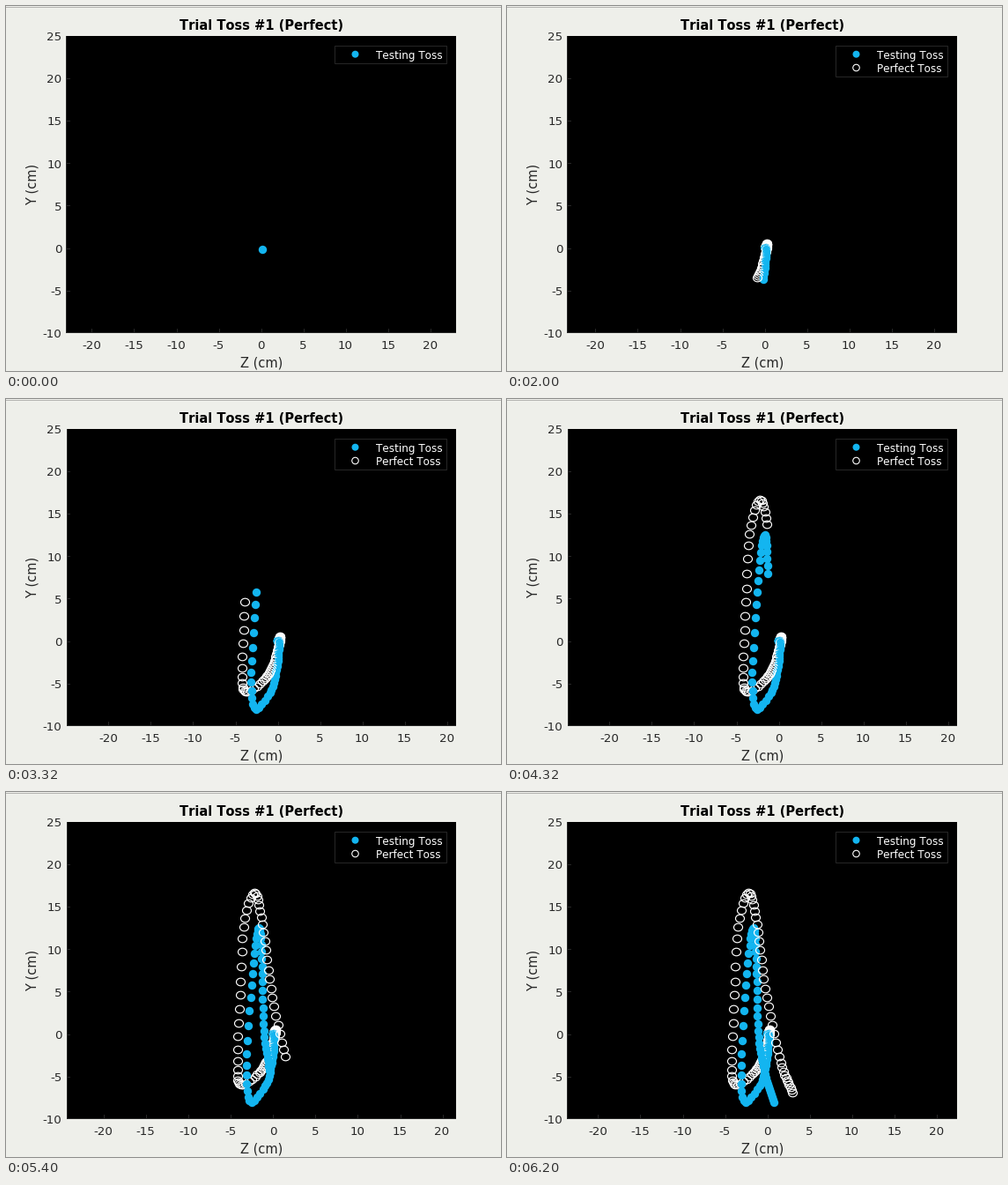
Recreate the animation shown at these times as a matplotlib script. Size 562 by 414 pixels, loop 6.32 s.

```python
import math

import numpy as np
import matplotlib.pyplot as plt
from matplotlib.animation import FuncAnimation
from matplotlib.collections import EllipseCollection
from matplotlib.patches import Ellipse, Rectangle

W, H, DPI = 562, 414, 64
PT = 72 / DPI                      # points per pixel
PAPER, INK, BLUE = "#eeefea", "#262626", "#13b5f0"
LEFT, RIGHT, TOP, BOTTOM = 68, 511, 34, 371
MID, ZERO, UNIT = 290.2, 275, 9.62

# Sample index, then z and y (cm) of the testing and the perfect toss
BEATS = [
    (0, 0, 0, .05, .1),                     # rest
    (14, -.02, 0, .28, .5),
    (28, .1, -.4, .05, -.65),
    (38, -.1, -3, -.7, -3.1),               # dip
    (46, -.95, -6.1, -1.85, -4.75),
    (52, -2.8, -7.87, -3.8, -6),
    (57, -3.14, -3.65, -4.22, -4.2),        # throw
    (63, -2.55, 5.8, -3.92, 4.6),
    (68, -2, 11.25, -3.5, 12.6),
    (74, -1.55, 12.2, -2.25, 16.65),        # top
    (80, -1.32, 8, -1.4, 13.75),
    (88, -1.1, .35, -.28, 5.4),             # fall
    (96, -.4, -4.3, 1.4, -2.65),
    (107, .8, -8.05, 2.97, -6.95),
]


def spline(keys):
    """Smooth curve through the keys, sampled at every whole index."""
    t, *axes = np.array(keys, float).T
    s = np.arange(t[-1] + 1)
    i = np.clip(np.searchsorted(t, s, "right") - 1, 0, len(t) - 2)
    h = t[i + 1] - t[i]
    u = (s - t[i]) / h
    out = []
    for v in axes:
        m = np.gradient(v, t)
        out.append((1 + 2 * u) * (1 - u) ** 2 * v[i]
                   + u * (1 - u) ** 2 * h * m[i]
                   + u * u * (3 - 2 * u) * v[i + 1]
                   + u * u * (u - 1) * h * m[i + 1])
    return np.column_stack(out)


# Dots are laid down in turns: testing, perfect, testing, perfect...
path = spline(BEATS).reshape(-1, 2)
is_test = np.arange(len(path)) % 2 == 0

plt.rcParams["font.family"] = "DejaVu Sans"
plt.rcParams["text.kerning_factor"] = 6    # evenly set type, no kerning
fig = plt.figure(figsize=(W / DPI, H / DPI), dpi=DPI, facecolor=PAPER)
ax = fig.add_axes([0, 0, 1, 1])
ax.set_xlim(0, W)
ax.set_ylim(H, 0)
ax.axis("off")


def label(x, y, s, px, color=INK, ha="center", **kw):
    return ax.text(x, y, s, fontsize=px * PT, color=color, ha=ha,
                   va="baseline", rotation_mode="anchor", **kw)


def box(x, y, w, h, fc=INK, ec="none", **kw):
    return ax.add_patch(Rectangle((x, y), w, h, fc=fc, ec=ec, **kw))


def to_y(cm):
    return ZERO - UNIT * cm


box(0, 1, W, 1, "#b4b4b1")
plot = box(LEFT, TOP, RIGHT - LEFT, BOTTOM - TOP, "black")
z_axis = box(LEFT, BOTTOM - 1, RIGHT - LEFT, 1)
y_axis = box(LEFT, TOP, 1, BOTTOM - TOP)

label(290, 27, "Trial Toss #1 (Perfect)", 14.67, "black", weight="bold")
label(290, 409, "Z (cm)", 14.67)
label(34.5, 202.5, "Y (cm)", 14.67, rotation=90)
for v in range(-10, 26, 5):
    label(63.5, to_y(v) + 4.7, str(v), 13.33, ha="right")
    if -10 < v < 25:
        box(LEFT + 1, math.floor(to_y(v)), 4, 1)

z_ticks = [box(0, BOTTOM - 5, 1, 4) for _ in range(10)]
z_labels = [label(0, 389, "", 13.33) for _ in range(10)]

dots = EllipseCollection(
    [9.4], [9.4], [0], units="xy", offsets=path[:1],
    offset_transform=ax.transData, zorder=3)
ax.add_collection(dots, autolim=False)

key_box = box(372.5, 44.5, 127, 20, "black", INK, lw=PT, zorder=4)
label(420, 60, "Testing Toss", 12, "white", ha="left", zorder=5)
ax.add_patch(Ellipse((396.5, 54.7), 8, 8, fc=BLUE, ec="none", zorder=5))
second = [
    label(420, 75, "Perfect Toss", 12, "white", ha="left", zorder=5),
    ax.add_patch(Ellipse((396.5, 70), 7.5, 7.5, fc="none", ec="white",
                         lw=1.1 * PT, zorder=5)),
]


def dot_count(step):
    """Dots on show; the pace falls slowly as the plot fills."""
    if step < 3:
        return 1 if step == 0 else 2
    return min(2 * round(2.2 * step - .0075 * step ** 2), len(path))


def draw(tick):
    # Steps last 120 and 80 ms in turn
    step = 2 * (tick // 5) + (tick % 5 >= 3)
    n = dot_count(step)
    shown, test = path[:n], is_test[:n]
    centre = (shown[:, 0].min() + shown[:, 0].max()) / 2

    def to_x(cm):
        return MID + UNIT * (cm - centre)

    xy = np.column_stack([to_x(shown[:, 0]), to_y(shown[:, 1])])
    dots.set_offsets(np.floor(xy) + .5)
    dots.set_widths(np.where(test, 9.4, 10))
    dots.set_heights(np.where(test, 9.4, 8.6))
    dots.set_facecolor([BLUE if b else "none" for b in test])
    dots.set_edgecolor(["none" if b else "white" for b in test])
    dots.set_linewidth([0 if b else 1.15 * PT for b in test])

    left = LEFT + (centre < -1)
    for part in (plot, z_axis):
        part.set_x(left)
        part.set_width(RIGHT - left)
    y_axis.set_x(left)

    first = math.ceil((centre - 23) / 5)
    for i, (mark, text) in enumerate(zip(z_ticks, z_labels)):
        v = 5 * (first + i)
        mark.set_x(math.floor(to_x(v)))
        text.set_x(round(to_x(v) - 1))
        text.set_text(str(v))
        for item in (mark, text):
            item.set_visible(v <= centre + 23)

    for item in second:
        item.set_visible(step > 0)
    key_box.set_height(35 if step else 20)
    return ()


anim = FuncAnimation(fig, draw, frames=158, interval=40, repeat=True,
                     repeat_delay=0, blit=False)
plt.show()
```
